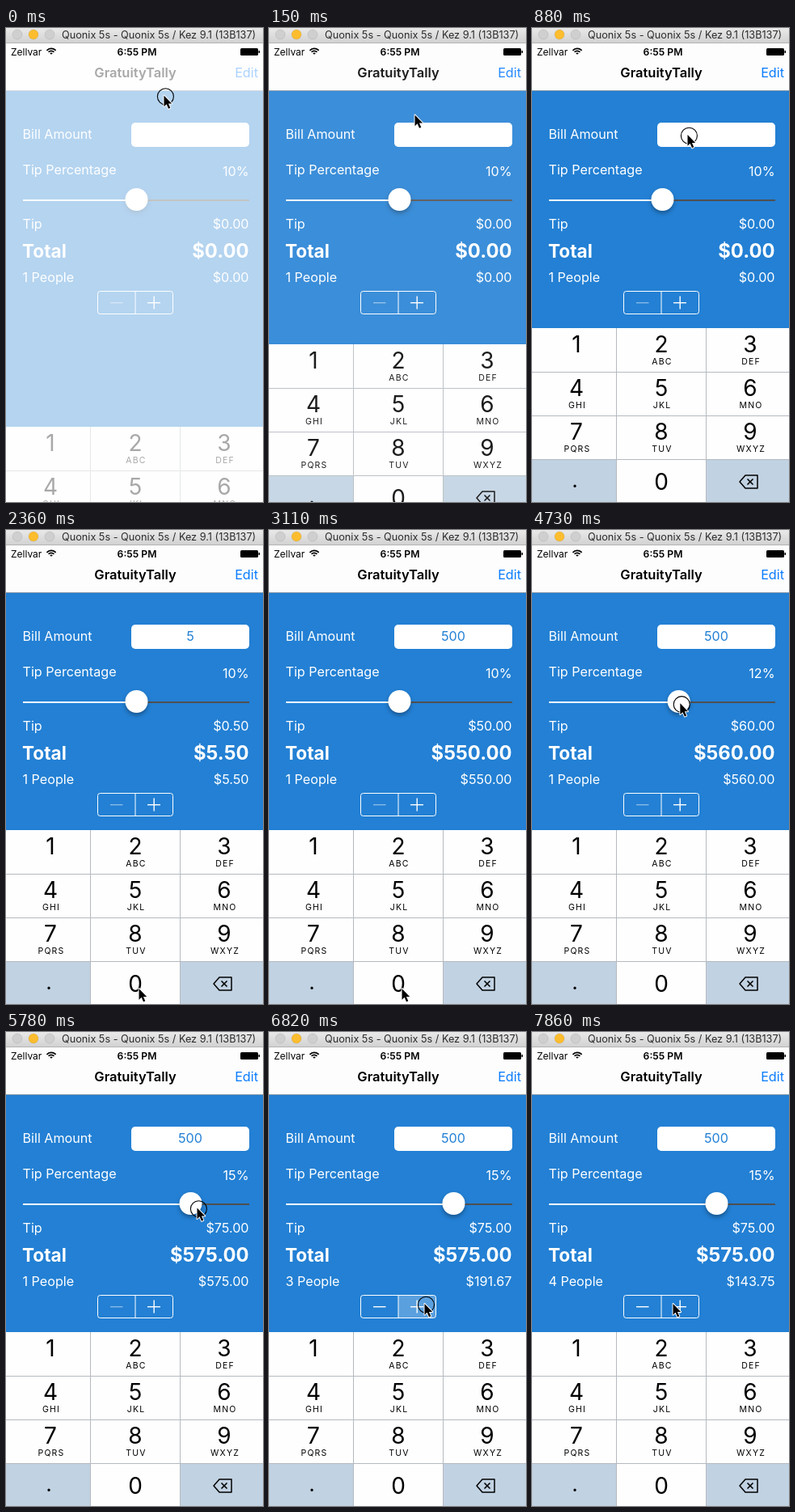
An HTML page with a canvas that plays this animation: 318 by 586 pixels, repeating every 8000 ms.

```html
<!DOCTYPE html>
<html lang="en">
<head>
<meta charset="utf-8">
<title>Tip calculator demo</title>
<style>
html, body { margin: 0; width: 100%; height: 100%; overflow: hidden; background: #fff; }
canvas { display: block; width: 318px; height: 586px; }
</style>
</head>
<body>
<canvas id="stage" width="318" height="586"></canvas>
<script>
const W = 318, H = 586, LOOP = 8000, STEP = 148.35, LAST = 53;
const BLUE = '#2380d4', INK = '#000', LABEL = 16.15;
const ctx = document.getElementById('stage').getContext('2d');

// Pointer moves: start step, end step, where it arrives
const START = { x: 195, y: 83.5 };
const DRAG = { from: 28, to: 39, x: 236, y: 217.5 };
const hops = [
  { from: 0, to: 1, x: 180, y: 107.5 },
  { from: 1, to: 4, x: 192, y: 132 },
  { from: 7, to: 12, x: 163, y: 472 },
  { from: 14, to: 16, x: 164, y: 567 },
  { from: 21, to: 27, x: 160, y: 213 },
  DRAG,
  { from: 40, to: 44, x: 192, y: 336 },
  { from: 52, to: 53, x: 174, y: 336 }
];

// Button held from one step to another, and what it presses
const taps = [
  { from: 0, to: 0 },
  { from: 6, to: 6 },
  { from: 12, to: 13, key: '5' },
  { from: 17, to: 17, key: '0' },
  { from: 19, to: 20, key: '0' },
  { from: 27, to: 39 },
  { from: 45, to: 45, key: '+' },
  { from: 46, to: 46, key: '+' },
  { from: 49, to: 49, key: '+' }
];

const letters = ['', 'ABC', 'DEF', 'GHI', 'JKL', 'MNO', 'PQRS', 'TUV', 'WXYZ'];
const keyX = [55, 160, 270];

const money = v => '$' + v.toFixed(2);
const settle = k => 6 ** -k;
const heldTap = k => taps.find(t => k >= t.from && k <= t.to);

function progress({ from, to }, k) {
  const u = Math.min(1, Math.max(0, (k - from) / (to - from)));
  return u * u * (3 - 2 * u);
}

function pointerAt(k) {
  return hops.reduce((p, hop) => {
    const e = progress(hop, k);
    return { x: p.x + (hop.x - p.x) * e, y: p.y + (hop.y - p.y) * e };
  }, START);
}

function stateAt(k) {
  const typed = taps.filter(t => t.key >= '0' && k > t.from).map(t => t.key).join('');
  const people = 1 + taps.filter(t => t.key === '+' && k >= t.from).length;
  const thumb = 161.5 + 67 * progress(DRAG, k);
  const percent = Math.round(20 * (thumb - 35) / 252);
  const tip = typed * percent / 100;
  return { typed, people, thumb, percent, tip, total: +typed + tip };
}

function text(str, x, y, size, color, align = 'left', weight = 400) {
  ctx.font = `${weight} ${size}px Inter, "Liberation Sans", sans-serif`;
  ctx.textAlign = align;
  ctx.fillStyle = color;
  ctx.fillText(str, x, y);
}

function row(label, value, y) {
  text(label, 20.5, y, LABEL, '#fff');
  text(value, 300.5, y, LABEL, '#fff', 'right');
}

function rect(x, y, w, h, color) {
  ctx.fillStyle = color;
  ctx.fillRect(x, y, w, h);
}

function disc(x, y, r, color) {
  ctx.fillStyle = color;
  ctx.beginPath();
  ctx.arc(x, y, r, 0, Math.PI * 2);
  ctx.fill();
}

function box(x, y, w, h, r, color) {
  ctx.beginPath();
  ctx.roundRect(x, y, w, h, r);
  ctx.fillStyle = color;
  ctx.fill();
}

function poly(points, close) {
  ctx.beginPath();
  points.forEach(([x, y]) => ctx.lineTo(x, y));
  if (close) ctx.closePath();
}

function stroke(color, width) {
  ctx.strokeStyle = color;
  ctx.lineWidth = width;
  ctx.stroke();
}

function drawWindowBar() {
  const g = ctx.createLinearGradient(0, 0, 0, 18);
  g.addColorStop(0, '#e9e9e9');
  g.addColorStop(1, '#d2d2d2');
  rect(0, 0, W, 18, g);
  rect(0, 18, W, 1, '#b4b4b4');
  ['#cfcfcf', '#fdbd2e', '#cfcfcf'].forEach((fill, i) => {
    disc(14 + 20 * i, 8, 6, fill);
    stroke('rgba(0,0,0,0.12)', 0.7);
  });
  text('Quonix 5s - Quonix 5s / Kez 9.1 (13B137)', 69, 13, 12.7, '#2b2b2b');
}

function drawStatus() {
  text('Zellvar', 6, 34, 12, INK);
  text('6:55 PM', 162, 34, 12.2, INK, 'center', 600);
  [7.6, 4.7, 1.6].forEach(r => {
    ctx.beginPath();
    ctx.arc(56, 33, r, -Math.PI * 0.76, -Math.PI * 0.24);
    stroke(INK, 1.7);
  });
  box(290, 25, 22, 9, 1.5, INK);
  rect(312.5, 28, 1.5, 3, INK);
}

function drawSlider(x) {
  rect(x, 212, 301 - x, 2, '#504f50');
  rect(21, 212, x - 21, 2, '#fff');
  ctx.save();
  ctx.shadowColor = 'rgba(0,0,0,0.32)';
  ctx.shadowBlur = 5;
  ctx.shadowOffsetY = 3;
  disc(x, 212, 14, '#fff');
  ctx.restore();
}

function drawStepper(people, pressed) {
  if (pressed) box(160, 325.5, 46.5, 28, [0, 3, 3, 0], 'rgba(255,255,255,0.25)');
  ctx.beginPath();
  ctx.roundRect(113.5, 325.5, 93, 28, 3);
  stroke('#fff', 1);
  rect(159.5, 325.5, 1, 28, '#fff');
  rect(129, 339, 15.5, 1.4, people > 1 ? '#fff' : 'rgba(255,255,255,0.45)');
  rect(175, 339, 16, 1.4, '#fff');
  rect(182.5, 331.5, 1.4, 16, '#fff');
}

function drawForm(s, pressed) {
  rect(0, 19, W, 58, '#fdfdfd');
  text('GratuityTally', 160, 61, 16.5, INK, 'center', 600);
  text('Edit', 312, 61, 16.2, '#0a7cff', 'right');
  rect(0, 77, W, H - 77, BLUE);
  rect(0, 77, W, 1, '#7c93a8');

  text('Bill Amount', 20.5, 137, LABEL, '#fff');
  box(155, 117, 146, 30, 5, '#fff');
  text(s.typed, 228, 137, LABEL, BLUE, 'center');
  text('Tip Percentage', 20.5, 181, LABEL, '#fff');
  text(s.percent + '%', 300.5, 182.5, LABEL, '#fff', 'right');
  drawSlider(s.thumb);

  row('Tip', money(s.tip), 248);
  text('Total', 20, 284, 22.6, '#fff', 'left', 700);
  text(money(s.total), 300.5, 284, 23.8, '#fff', 'right', 700);
  row(s.people + ' People', money(s.total / s.people), 314);
  drawStepper(s.people, pressed === '+');
}

function drawDelete(y) {
  ctx.lineJoin = 'round';
  poly([[257, y], [264, y - 8], [279, y - 8], [279, y + 8], [264, y + 8]], true);
  stroke(INK, 1.5);
  [-3.5, 3.5].forEach(d => {
    poly([[266.5, y - d], [273.5, y + d]]);
    stroke(INK, 1.6);
  });
}

function drawPad(k, pressed) {
  const top = Math.round(371 + 122 * settle(k));
  const rowY = n => top + 54 * n, colX = c => 111 * c - 6;
  const cell = (c, r) => rect(colX(c), rowY(r), 111, 54, '#c1d2e2');

  rect(0, top, W, H - top, '#fefefe');
  cell(0, 3);
  cell(2, 3);
  if (pressed === '5') cell(1, 1);
  if (pressed === '0') cell(1, 3);
  for (let n = 1; n < 4; n++) rect(0, rowY(n), W, 1, '#b5bac0');
  for (let n = 1; n < 3; n++) rect(colX(n) - 1, top, 1, H - top, '#b5bac0');

  letters.forEach((label, i) => {
    const x = keyX[i % 3], y = rowY(Math.floor(i / 3));
    text(String(i + 1), x, y + 30, 28, INK, 'center');
    ctx.letterSpacing = '1.2px';
    text(label, x + 1, y + 45, 10.5, INK, 'center');
    ctx.letterSpacing = '0px';
  });
  text('.', 53, rowY(3) + 35, 26, INK, 'center');
  text('0', 160, rowY(3) + 38, 28, INK, 'center');
  drawDelete(rowY(3) + 28);
}

function drawPointer({ x, y }, held) {
  if (held) {
    ctx.beginPath();
    ctx.arc(x + 2.4, y + 1.3, 10, 0, Math.PI * 2);
    stroke(INK, 1.1);
  }
  ctx.save();
  ctx.translate(x + 0.5, y);
  ctx.scale(0.94, 0.94);
  poly([[0, 0], [0, 14.5], [3.3, 11.5], [5.9, 17.3], [8.3, 16.3], [5.8, 10.6], [10.3, 10.6]], true);
  ctx.lineJoin = 'round';
  stroke('#fff', 2);
  ctx.fillStyle = INK;
  ctx.fill();
  ctx.restore();
}

function draw(k) {
  const tap = heldTap(k), pressed = tap && tap.key;
  drawForm(stateAt(k), pressed);
  drawPad(k, pressed);
  rect(0, 19, W, H - 19, `rgba(255,255,255,${(0.66 * settle(k)).toFixed(3)})`);
  drawStatus();
  drawWindowBar();
  drawPointer(pointerAt(k), tap);
}

function tick() {
  const t = performance.now() % LOOP;
  draw(Math.min(LAST, Math.floor((t + 20) / STEP)));
  requestAnimationFrame(tick);
}
tick();
</script>
</body>
</html>
```
